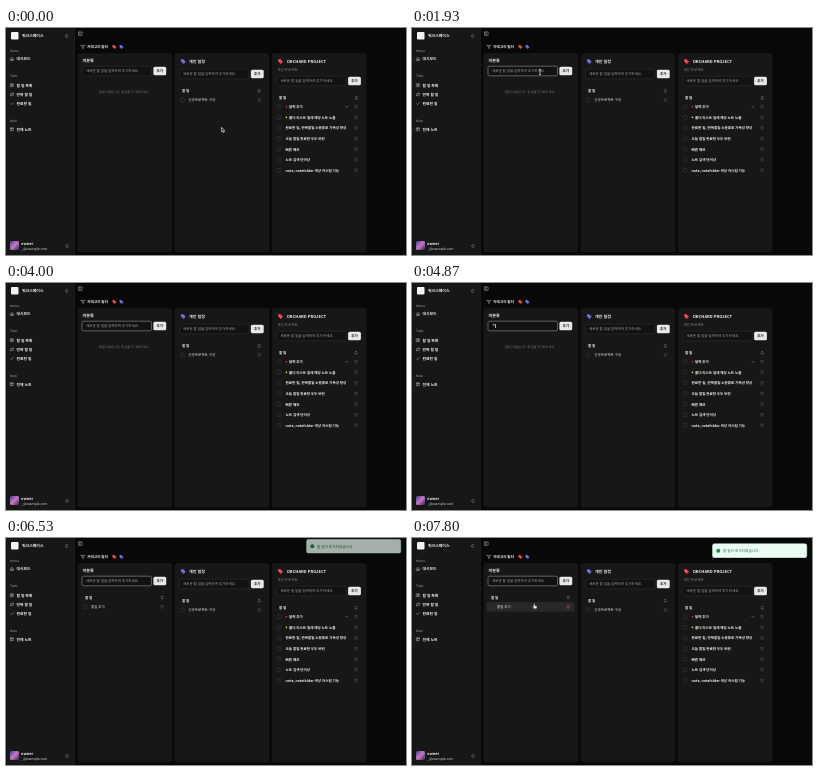
Animation of 400 by 227 pixels, one loop 8 s. Source, as an HTML page:

```html
<!DOCTYPE html>
<html>
<head>
<meta charset="utf-8">
<title>Todo board</title>
<style>
  html, body { margin: 0; width: 100%; height: 100%; overflow: hidden; background: #080808; }
  #stage { position: absolute; left: 0; top: 0; width: 400px; height: 227px; overflow: hidden; }
  svg { display: block; }
  text, .typed { font-family: "Noto Sans CJK KR", "Noto Sans CJK", sans-serif; text-rendering: geometricPrecision; }
  .icon { fill: none; stroke-width: 2.2; stroke-linecap: round; stroke-linejoin: round; }

  .typed {
    position: absolute; left: 80px; top: 40.2px; height: 5.4px;
    font-size: 3.6px; line-height: 5.4px; white-space: pre; color: #f2f2f2;
  }
  .typed::before { content: ""; animation: typing 8s step-end infinite; }
  .typed::after {
    content: ""; position: absolute; left: 100%; top: .4px; width: .5px; height: 4.6px;
    background: #aaa; animation: blink 8s step-end infinite;
  }

  /* Hard switches */
  .step { animation: 8s step-end infinite; }
  #focus { animation-name: focus; }
  #hint { animation-name: hint; }
  #empty { animation-name: before; }
  #added { animation-name: after; }
  .hover { animation-name: hover; }
  #arrow { animation-name: arrow; }
  #beam { animation-name: beam; }
  #hand { animation-name: hover; }

  #cursor { animation: move 8s infinite; }
  #toast { animation: toast 8s infinite; }

  @keyframes typing {
    0% { content: ""; }
    60.8% { content: "ㅎ"; }
    61.6% { content: "하"; }
    63.3% { content: "할"; }
    65% { content: "할ㅇ"; }
    66.6% { content: "할이"; }
    69.1% { content: "할일"; }
    70% { content: "할일 "; }
    70.8% { content: "할일 ㅊ"; }
    73.3% { content: "할일 추"; }
    75% { content: "할일 추ㄱ"; }
    76.6% { content: "할일 추가"; }
    79.1%, 100% { content: ""; }
  }
  @keyframes blink {
    0%, 21.6%, 34.9%, 46.6%, 58.3%, 79.1%, 92.5%, 100% { opacity: 0; }
    11.6%, 29.1%, 40.8%, 51.6%, 60.8%, 84.9% { opacity: 1; }
  }
  @keyframes focus { 0% { opacity: 0; } 11.6%, 100% { opacity: 1; } }
  @keyframes hint { 0%, 79.1%, 100% { opacity: 1; } 60.8% { opacity: 0; } }
  @keyframes before { 0% { opacity: 1; } 79.1%, 100% { opacity: 0; } }
  @keyframes after { 0% { opacity: 0; } 79.1%, 100% { opacity: 1; } }
  @keyframes hover { 0% { opacity: 0; } 94.5%, 100% { opacity: 1; } }
  @keyframes arrow { 0%, 90.4% { opacity: 1; } 9%, 94.5%, 100% { opacity: 0; } }
  @keyframes beam { 0%, 31%, 90.4%, 100% { opacity: 0; } 9%, 87.9% { opacity: 1; } }
  @keyframes move {
    0%, .8% { transform: translate(217px, 102px); animation-timing-function: ease-in-out; }
    10.9%, 87.9% { transform: translate(128px, 44px); animation-timing-function: ease-in-out; }
    97%, 100% { transform: translate(122.8px, 68.3px); }
  }
  @keyframes toast {
    0%, 79.6% { transform: translateY(-14.5px); opacity: 0; animation-timing-function: ease; }
    84.6%, 100% { transform: none; opacity: 1; }
  }
</style>
</head>
<body>
<div id="stage">
  <svg id="board" width="400" height="227" viewBox="0 0 400 227"></svg>
  <span class="typed"></span>
</div>
<script>
const icons = {
  home: "M3 10l9-7 9 7v11H3zM9 21v-8h6v8",
  list: "M4 3h16v18H4zM8 8h8M8 12h8M8 16h5",
  repeat: "M17 2l4 4-4 4M3 11V9a3 3 0 0 1 3-3h15M7 22l-4-4 4-4M21 13v2a3 3 0 0 1-3 3H3",
  check: "M4 12l5 6L20 5",
  note: "M4 3h16v18H4zM4 8h16M9 8v13",
  sort: "M7 9l5-5 5 5M7 15l5 5 5-5",
  down: "M5 9l7 7 7-7",
  panel: "M3 3h18v18H3zM9 3v18",
  filter: "M2 3h20l-8 9v8l-4-2v-6z",
  trash: "M3 6h18M8 6V3h8v3M5 6l1 15h12l1-15M10 11v6M14 11v6"
};

const text = (x, y, str, size = 3.6, fill = "#f0f0f0", weight = 700, anchor = "start") =>
  `<text x="${x}" y="${y + size * .37}" font-size="${size}" fill="${fill}" font-weight="${weight}" text-anchor="${anchor}">${str}</text>`;

const rect = (x, y, w, h, fill, r = 0, stroke = "none", width = .5) =>
  `<rect x="${x}" y="${y}" width="${w}" height="${h}" rx="${r}" fill="${fill}" stroke="${stroke}" stroke-width="${width}"/>`;

const dot = (x, y, r, fill) => `<circle cx="${x}" cy="${y}" r="${r}" fill="${fill}"/>`;

// Icons are centred on (x, y)
const icon = (name, x, y, size = 4.6, stroke = "#ddd") =>
  `<path class="icon" stroke="${stroke}" d="${icons[name]}" transform="translate(${x} ${y}) scale(${size / 24}) translate(-12 -12)"/>`;

const tag = (x, y, size, fill) =>
  `<g transform="translate(${x} ${y}) scale(${size / 24}) translate(-12 -12)">
    <path fill="${fill}" stroke="${fill}" stroke-width="2" stroke-linejoin="round" d="M2 2h10l10 11-9 9L2 12z"/>
    <circle cx="7.5" cy="7.5" r="2" fill="#eee"/></g>`;

const group = (id, body, cls = "step") => `<g id="${id}" class="${cls}">${body}</g>`;

const hintText = "새로운 할 일을 입력하여 추가하세요.";
const hint = (x, y) => text(x, y, hintText, 3.55, "#a4a4a4", 400);

const field = (x, y) =>
  rect(x, y - 4.8, 69.5, 9.6, "#121212", 1.5, "#303030") +
  rect(x + 71.4, y - 4.3, 12.8, 8.6, "#e8e8e8", 1.5) +
  text(x + 77.8, y, "추가", 3.5, "#161616", 700, "middle");

const listHead = (x, y) => text(x, y, "할 일") + icon("sort", x + 77.3, y, 4.8, "#ccc");

const row = (x, y, label, indent = 6, weight = 500) =>
  rect(x - 1.8, y - 1.9, 3.8, 3.8, "none", .8, "#424242", .45) +
  text(x + indent, y, label, 3.55, "#f0f0f0", weight) +
  icon("trash", x + 77, y, 4.2, "#4a4a4a");

const blue = "#6a6ce0", red = "#e5484d", yellow = "#e6d36a";

function sidebar() {
  const item = (name, y, label) => icon(name, 6, y, 4) + text(10.6, y, label, 3.8);
  const head = (y, label) => text(4, y, label, 3.2, "#aaa", 500);
  return rect(0, 0, 68.5, 227, "#171717") + rect(68.2, 0, .5, 227, "#242424") +
    rect(5, 4, 7.5, 7.5, "#f4f4f4", 1) +
    text(16, 7.6, "워크스페이스", 3.9) + icon("sort", 60.6, 7.8, 4.8) +
    head(22.5, "Home") + item("home", 30.8, "대시보드") +
    head(48, "Todo") + item("list", 57.2, "할 일 목록") +
    item("repeat", 66.4, "반복 할 일") + item("check", 75.7, "완료한 일") +
    head(93, "Note") + item("note", 101.2, "전체 노트") +
    rect(4, 213, 9, 9, "url(#avatar)", 1.5) +
    text(15, 215.6, "owner", 3.9) +
    text(15, 220.3, "_@example.com", 3.4, "#ddd", 500) +
    icon("sort", 61, 218, 4.8);
}

function header() {
  return icon("panel", 74.5, 5.6, 4.4) + icon("filter", 77, 19.1, 4.6) +
    text(81.3, 19, "카테고리 필터") +
    tag(108.5, 19, 4.4, red) + tag(115.5, 19, 4.4, blue);
}

function inbox() {
  const x = 79;
  return text(76.5, 32, "미분류", 4.1) + field(76, 43) +
    group("focus", rect(76, 38.2, 69.5, 9.6, "none", 1.5, "#757575", .7)) +
    group("hint", hint(80, 43)) +
    group("empty", text(118, 64, "할일이 없습니다. 할 일을 추가해주세요.", 3.1, "#777", 400, "middle")) +
    group("added", listHead(x, 59.5) +
      `<g class="step hover">${rect(74.5, 64, 88, 9.8, "#282828", 1.5)}</g>` +
      row(x, 68.8, "할일 추가") +
      `<g class="step hover">${icon("trash", x + 77, 68.8, 4.2, "#a03538")}</g>`);
}

function personal() {
  return tag(177.3, 33.6, 5.2, blue) + text(183, 33.8, "개인 일정", 4.1) +
    field(173.5, 46) + hint(177, 46) + listHead(176, 62.8) + row(176.3, 72, "신규프로젝트 구상");
}

function project() {
  const x = 273, top = 78.8, gap = 10.6;
  const labels = [
    "달력 추가", "폴더 리스트 일에 해당 노트 노출", "완료한 일, 반복할일 소분류로 가독성 향상",
    "오늘 할일 완료한 우두 버린", "빠른 메모", "노트 검색 단어상", "note, notefolder 색상 커스텀 기능"
  ];
  const marks = [red, yellow];
  const rows = labels.map((label, i) => {
    const y = top + i * gap;
    return row(x, y, label, marks[i] ? 10 : 6.6, 700) + (marks[i] ? dot(280.4, y, .8, marks[i]) : "");
  });
  return tag(274.6, 33.6, 5.2, red) + text(280.7, 33.8, "ORCHARD PROJECT", 4.1) +
    text(271.3, 41.4, "개인 프로젝트", 3.55, "#888", 400) +
    field(270.7, 53) + hint(274.3, 53) + listHead(x, 69.8) + rows.join("") +
    icon("down", 340.8, top, 3.2, "#eee");
}

function toast() {
  return group("toast",
    rect(300.5, 5.7, 94.3, 14, "#ecfdf3", 2, "#bff0d2") +
    dot(306.3, 12.8, 2, "#0f8a3c") +
    icon("check", 306.3, 12.8, 2.2, "#ecfdf3") +
    text(311, 12.8, "할 일이 추가되었습니다.", 3.7, "#17693a", 500), "");
}

function cursor() {
  const shape = d => `<path d="${d}" fill="#111" stroke="#fff" stroke-width=".6" stroke-linejoin="round"/>`;
  return group("cursor",
    group("arrow", shape("M-1.4 -2.6V1.8L-.4 .9L.4 2.6L1.2 2.2L.5 .7H1.8Z")) +
    group("beam", `<path d="M-1 -2.6Q0 -2.6 0 -1.9V1.9Q0 2.6 -1 2.6M1 -2.6Q0 -2.6 0 -1.9M0 1.9Q0 2.6 1 2.6" fill="none" stroke="#eee" stroke-width=".7"/>`) +
    group("hand", `<path d="M-.9 -2.2q.5 -.6 .9 0V-.5L1.6 -.1Q2.1 .1 2 .8L1.5 2.2H-.8L-2 .6q.1 -.7 .7 -.3l.4 .3Z" fill="#fff"/>`), "");
}

const panels = [71.7, 168.9, 266.1].map(x => rect(x, 25.5, 94.2, 198.5, "#171717", 2.5, "#202020", .4));

document.getElementById("board").innerHTML =
  `<defs><linearGradient id="avatar" x2="1" y2="1">
    <stop stop-color="#4a3a9a"/><stop offset=".5" stop-color="#c47abf"/><stop offset="1" stop-color="#3a2158"/>
  </linearGradient></defs>` +
  rect(0, 0, 400, 227, "#080808") + sidebar() + header() + panels.join("") +
  inbox() + personal() + project() + toast() + cursor();
</script>
</body>
</html>
```
